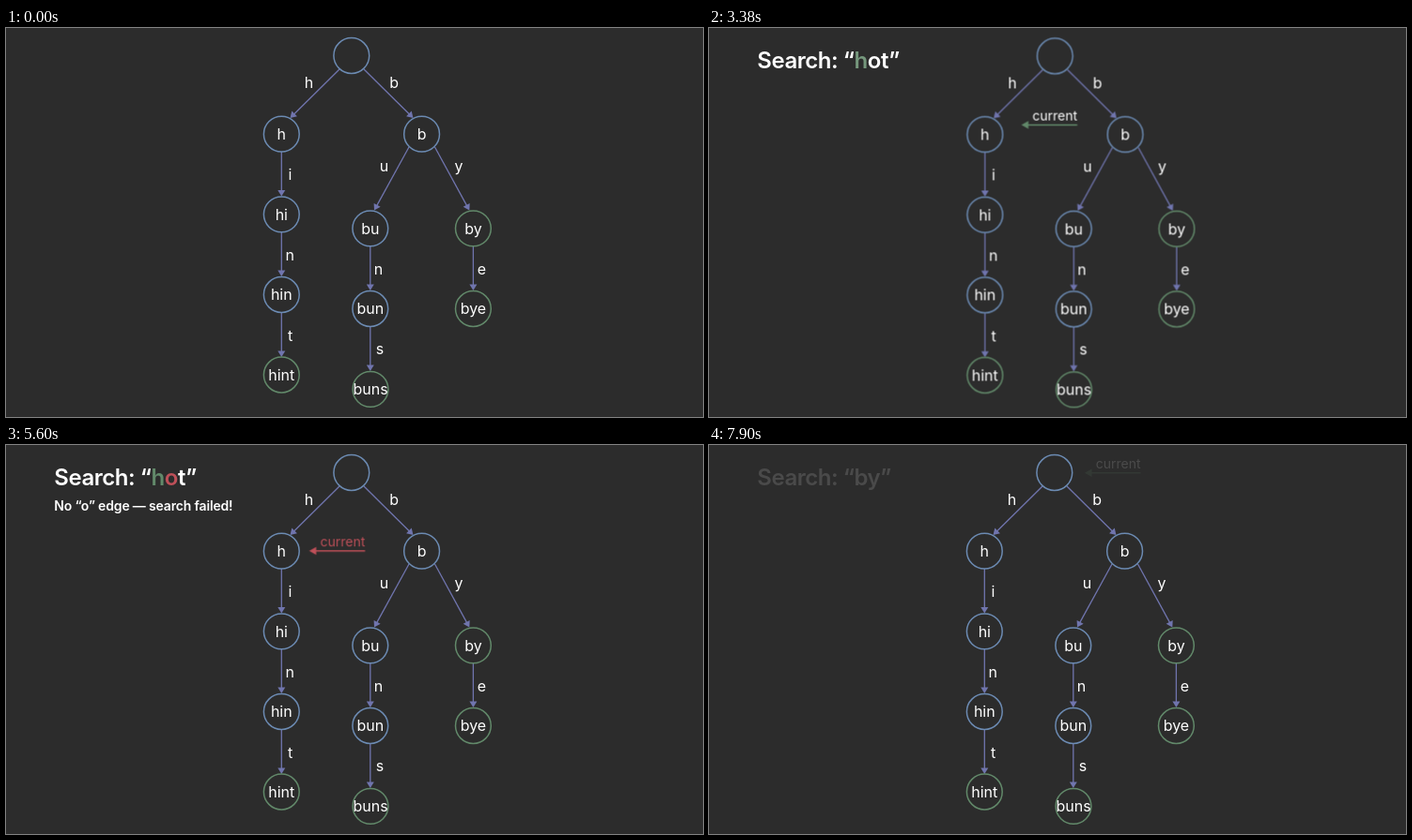
An HTML page for the animation above (7.99 s loop, 742x415 px).

```html
<!DOCTYPE html>
<html lang="en">
<head>
<meta charset="utf-8">
<title>Trie search</title>
<style>
  :root {
    --bg: #2c2c2c;
    --ink: #fff;
    --blue: #6c8bb3;
    --green: #62896a;
    --edge: #7075ae;
    --red: #bf5059;
    --out: cubic-bezier(.39, .575, .565, 1);
    --spring: linear(0, .09 4.5%, .264 8.9%, .442 13.4%, .594 17.9%, .713 22.3%, .801 26.8%,
      .864 31.3%, .908 35.7%, .96 44.6%, .983 53.6%, .993 62.5%, .999 80.4%, 1);
  }
  html, body { margin: 0; width: 100%; height: 100%; overflow: hidden; background: var(--bg); }
  svg { display: block; width: 742px; height: 415px; }
  text { font: 400 16px Inter, sans-serif; font-optical-sizing: none; fill: var(--ink); }

  .mid { text-anchor: middle; }
  .node { fill: none; stroke: var(--blue); stroke-width: 1.5; }
  .node.word { stroke: var(--green); }
  .edge { stroke: var(--edge); fill: var(--edge); stroke-width: 1.3; }
  .head { stroke: none; }
  .title { font-size: 24px; font-weight: 600; letter-spacing: -.019em; }
  .note { font-size: 14px; font-weight: 600; letter-spacing: -.012em; }
  .pointer text { font-size: 14px; }
  .pointer .edge { stroke: var(--green); fill: var(--green); stroke-width: 1.5; }

  .scene, .show, .next, .move, .hit, .miss, .note, .pointer .hot { animation: 7990ms linear infinite both; }
  .scene { animation-name: nudge; animation-timing-function: step-end; }
  .show { animation-name: show; }
  .next { animation-name: next; }
  .move { animation-name: move; }
  .hit { animation-name: hit; }
  .miss { animation-name: miss; }
  .note { animation-name: note; }
  .pointer .hot { animation-name: warn; }

  /* The scene sits off the pixel grid while the pointer travels. */
  @keyframes nudge {
    0%, 48.94%, 100% { transform: translate(0, 0); }
    33.41% { transform: translate(.5px, .4px); }
  }
  @keyframes show {
    0%, 11.89% { opacity: 0; animation-timing-function: var(--out); }
    18.15% { opacity: 1; }
    76.22% { opacity: 1; animation-timing-function: var(--out); }
    82.48%, 100% { opacity: 0; }
  }
  @keyframes next {
    0%, 98.31% { opacity: 0; }
    100% { opacity: .42; }
  }
  @keyframes move {
    0%, 32.69% { transform: translate(0, 0); animation-timing-function: var(--spring); }
    48.96%, 100% { transform: translate(-77.3px, 83.2px); }
  }
  @keyframes hit {
    0%, 32.69% { fill: var(--ink); animation-timing-function: var(--spring); }
    48.96%, 100% { fill: var(--green); }
  }
  @keyframes miss {
    0%, 54.07% { fill: var(--ink); animation-timing-function: var(--out); }
    60.33%, 100% { fill: var(--red); }
  }
  @keyframes note {
    0%, 54.07% { opacity: 0; animation-timing-function: var(--out); }
    60.33%, 100% { opacity: 1; }
  }
  @keyframes warn {
    0%, 54.07% { stroke: var(--green); fill: var(--green); animation-timing-function: var(--out); }
    60.33%, 100% { stroke: var(--red); fill: var(--red); }
  }
</style>
</head>
<body>
<svg viewBox="0 0 742 415">
  <g class="scene">
    <g id="tree"></g>
    <g class="show"><g class="pointer move">
      <text class="mid miss" x="435.6" y="24.5">current</text>
      <g class="edge hot"><path d="M459.5 29.7H405"/><path class="head" d="M400 29.7l7.5-4.2v8.4z"/></g>
    </g></g>
    <g class="next pointer">
      <text class="mid" x="435.6" y="24.5">current</text>
      <g class="edge"><path d="M459.5 29.7H405"/><path class="head" d="M400 29.7l7.5-4.2v8.4z"/></g>
    </g>
  </g>
  <g class="show">
    <text class="title" x="51.3" y="42.8">Search: “<tspan class="hit">h</tspan><tspan class="miss">o</tspan>t”</text>
    <text class="note" x="51.3" y="69.6">No “o” edge — search failed!</text>
  </g>
  <text class="title next" x="51.3" y="42.8">Search: “by”</text>
</svg>
<script>
  const tree = document.getElementById('tree');

  function add(tag, attrs, text = '') {
    const el = document.createElementNS('http://www.w3.org/2000/svg', tag);
    for (const key in attrs) el.setAttribute(key, attrs[key]);
    el.textContent = text;
    tree.append(el);
  }

  const label = (x, y, text) => add('text', { class: 'mid', x, y }, text);

  function node(x, y, text, word) {
    add('circle', { class: word ? 'node word' : 'node', cx: x, cy: y, r: 18.9 });
    label(x, y + 5.8, text);
  }

  function edge(x1, y1, x2, y2, text, tx, ty) {
    const turn = Math.atan2(y2 - y1, x2 - x1);
    const len = Math.hypot(x2 - x1, y2 - y1);
    const transform = `translate(${x1} ${y1}) rotate(${turn * 180 / Math.PI})`;
    add('path', { class: 'edge', transform, d: `M0 0H${len - 5}` });
    add('path', { class: 'edge head', transform, d: `M${len} 0l-6.5-4v8z` });
    label(tx, ty, text);
  }

  edge(355, 44, 302.5, 96, 'h', 322.5, 64.3);
  edge(381, 44, 433.5, 96, 'b', 413.2, 64.3);
  edge(293.3, 132, 293.3, 179.5, 'i', 302.5, 162.3);
  edge(293.3, 218, 293.3, 265, 'n', 302.3, 247.8);
  edge(293.3, 303.5, 293.3, 351, 't', 302.6, 333.6);
  edge(429, 127, 392, 194.5, 'u', 402.6, 152.6);
  edge(456.5, 127, 493.3, 194.5, 'y', 482, 152.6);
  edge(387.8, 233, 387.8, 280, 'n', 396.6, 262.8);
  edge(497.4, 233, 497.4, 280, 'e', 506.4, 262.8);
  edge(387.8, 319, 387.8, 366, 's', 398, 347.8);

  node(367.8, 29.5, '');
  node(293.3, 113.2, 'h');
  node(442.6, 113.2, 'b');
  node(293.3, 198.8, 'hi');
  node(293.3, 284.5, 'hin');
  node(293.3, 370, 'hint', true);
  node(387.8, 213.8, 'bu');
  node(387.8, 299.5, 'bun');
  node(388, 385.3, 'buns', true);
  node(497.4, 213.8, 'by', true);
  node(497.4, 299.5, 'bye', true);
</script>
</body>
</html>
```
